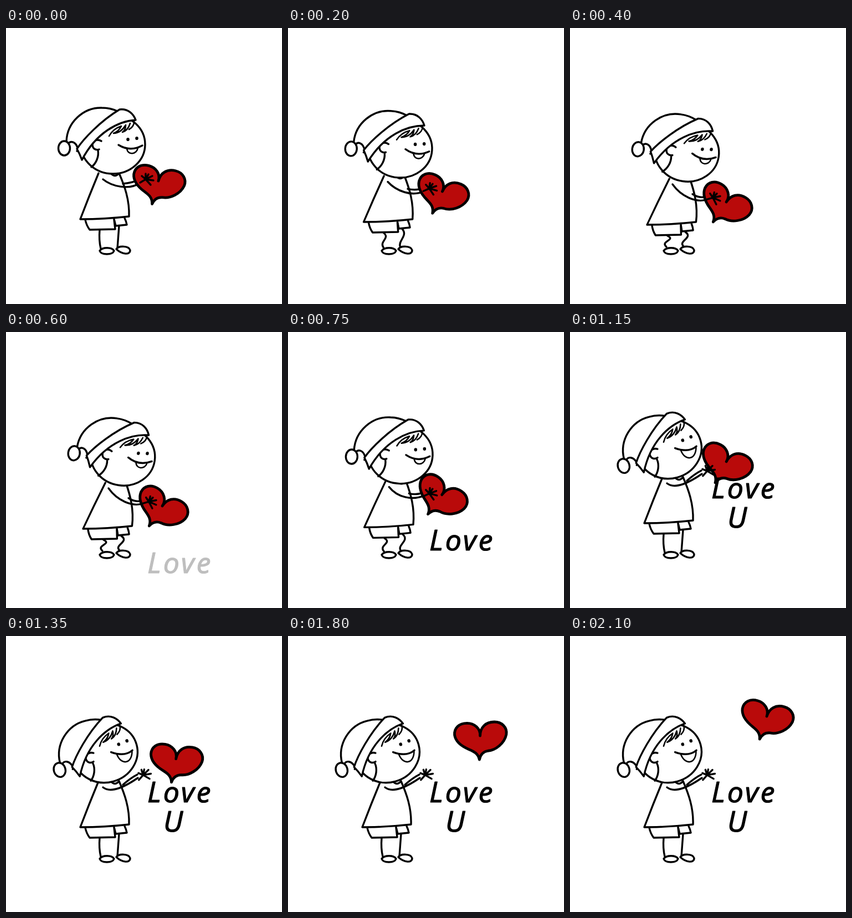
Write an HTML page that moves like this. It is 498 by 498 pixels and loops after 2550 ms.

```html
<!DOCTYPE html>
<html lang="en">
<head>
<meta charset="utf-8">
<title>Love U</title>
<style>
html, body { margin: 0; width: 100%; height: 100%; overflow: hidden; background: #fff; }
svg { display: block; width: 100vw; height: 100vh; }
path, ellipse { fill: #fff; stroke: #000; stroke-width: 3.4; stroke-linecap: round; stroke-linejoin: round; }
.line { fill: none; }
.dot { fill: #000; stroke: none; }
.thin { stroke-width: 2.6; }
.heart { fill: #b90a0a; stroke-width: 4.8; }
text { font: italic 400 52px "Open Sans", "Noto Sans", sans-serif; letter-spacing: 4px; stroke: #000; stroke-width: 1.2; stroke-linejoin: round; }
</style>
</head>
<body>
<svg viewBox="0 0 498 498">
  <path id="legs" class="line"/>
  <path d="M169 402C174 395 191 395 195 402C192 410 172 410 169 402Z"/>
  <path d="M199 399C204 392 222 393 224 401C224 410 210 409 199 399Z"/>
  <g id="body">
    <path d="M195 345L198 357L218 355Q217 349 214 343"/>
    <path d="M143 346Q145 356 151 364L197 363L195 346"/>
    <path d="M167 262Q150 303 134 345Q178 345 222 340C223 310 214 285 204 262"/>
    <path d="M189 262Q196 271 204 262"/>
  </g>
  <path id="arms" class="line"/>
  <g id="head">
    <ellipse cx="193" cy="210" rx="58" ry="53"/>
    <path class="line" d="M166 221C168 233 162 245 154 251"/>
    <path d="M172 204C166 200 157 202 156 210C156 218 162 221 168 219"/>
    <path class="thin" d="M186 195Q193 182 208 177Q204 186 194 190Q208 189 216 175Q216 184 210 188Q220 185 224 172M231 169Q231 178 222 183"/>
    <path d="M109 205C110 170 140 143 173 144Q188 144 201 150L128 222"/>
    <path class="line" d="M112 209C117 202 126 206 129 216"/>
    <path d="M128 218C140 200 170 168 205 147C220 145 230 155 234 166C203 168 163 188 137 238Q133 227 128 218Z"/>
    <ellipse cx="105" cy="217" rx="10.5" ry="13"/>
    <ellipse class="dot" cx="220" cy="201" rx="2.8" ry="3.1"/>
    <ellipse class="dot" cx="236" cy="199" rx="2.8" ry="3.1"/>
    <path id="tongue" class="thin"/>
    <path id="smile" class="line"/>
  </g>
  <g id="heart">
    <path class="heart" d="M0 0C0 -13 -12 -22 -25 -21C-40 -20 -48 -10 -46 2C-43 15 -30 22 -18 26C-9 29 -1 32 2 43C3 34 8 28 16 26C30 24 45 10 47 -6C48 -19 37 -28 24 -27C8 -26 -1 -15 0 0Z"/>
  </g>
  <path id="hand" class="line" d="M-13 7L-3 1L-10 -5M-3 1L-3 -9M-3 1L2 -8M-3 1L9 -5M-3 1L11 3M-3 1L6 11"/>
  <text id="love" x="255" y="300">Love</text>
  <text id="u" x="284" y="353">U</text>
</svg>
<script>
const LOOP = 2550, STEP = 50, RELEASE = 1025, END = 2100;

// positions of ear, hand and heart notch as [x, y, angle]
const start = { head: [164, 211, 0], hand: [255, 272, 0], heart: [275, 276, 18] };
const low = { head: [182, 221, 8], hand: [261, 306, 15], heart: [282, 314, 36] };
const thrown = { head: [152, 220, -15.5], hand: [250, 249, -18], heart: [266, 238, 45] };

const set = (id, name, value) => document.getElementById(id).setAttribute(name, value);
const ramp = (t, a, b) => Math.min(1, Math.max(0, (t - a) / (b - a)));
const mix = (a, b, p) => a.map((v, i) => v + (b[i] - v) * p);
const place = (id, [x, y, angle], after = '') =>
  set(id, 'transform', `translate(${x} ${y}) rotate(${angle}) ${after}`);

// the heart drifts right while it rises, and rocks
function fly([x, y, angle], p) {
  return [x + 89 * Math.sin(p * Math.PI / 2), y - 93 * p ** 1.45, angle - 138 * p + 113 * p * p];
}

function draw(t) {
  const dip = ramp(t, 0, 400), swing = ramp(t, 650, RELEASE), flight = ramp(t, RELEASE, END);
  const pose = part => mix(mix(start[part], low[part], dip), thrown[part], swing);
  const c = dip * (1 - swing), bend = Math.sqrt(c), open = swing ** 3;
  const hand = pose('hand'), [hx, hy] = hand;
  const wx = hx - 12, wy = hy + 7 - 4 * c;

  place('head', pose('head'), 'translate(-164 -211)');
  place('hand', hand);
  place('heart', fly(pose('heart'), flight));
  set('body', 'transform', `matrix(1 0 ${-.0875 * c} 1 ${35.2 * c} ${10 * c})`);

  set('legs', 'd',
    `M${169 + 7 * c} ${364 + 11 * c}C${168 + 24 * bend} ${376 + 7 * c} ${168 - 6 * bend} ${386 - 2 * c} ${171 + 3 * c} ${398 - 3 * c}` +
    `M${204 + 4 * c} ${357 + 11 * c}C${203 + 20 * bend} ${372 + 6 * c} ${202 - 6 * bend} 384 ${201 + 3 * c} ${397 - 4 * c}`);
  set('arms', 'd',
    `M${175 + 10 * c} ${273 + 9 * c}C${190 + 10 * c} ${285 + 18 * c} ${wx - 22} ${wy + 15 - 7 * c} ${wx} ${wy}` +
    `M${211 + 10 * c} ${281 + (hy - 272) * .55}Q${wx - 13} ${wy} ${wx - 1} ${wy - 6}`);
  set('smile', 'd', `M203 211Q224 ${224 + 2 * open} ${246 - 5 * open} ${212 + 6 * open}`);
  set('tongue', 'd',
    `M${218 - 6 * open} ${217 + open}C${219 - 4 * open} ${230 + 11 * open} ${236 - open} ${229 + 11 * open} ${238 + 2 * open} ${216 + 3 * open}`);

  const drop = 148 * (1 - ramp(t, 550, 1100));
  const show = (id, from, to) => {
    set(id, 'transform', `translate(0 ${drop})`);
    set(id, 'opacity', ramp(t, from, to));
  };
  show('love', 550, 750);
  show('u', 750, 1050);
}

const begin = performance.now();
function tick() {
  const t = (performance.now() - begin) % LOOP;
  draw(Math.min(END, Math.floor(t / STEP) * STEP));
  requestAnimationFrame(tick);
}
tick();
</script>
</body>
</html>
```
